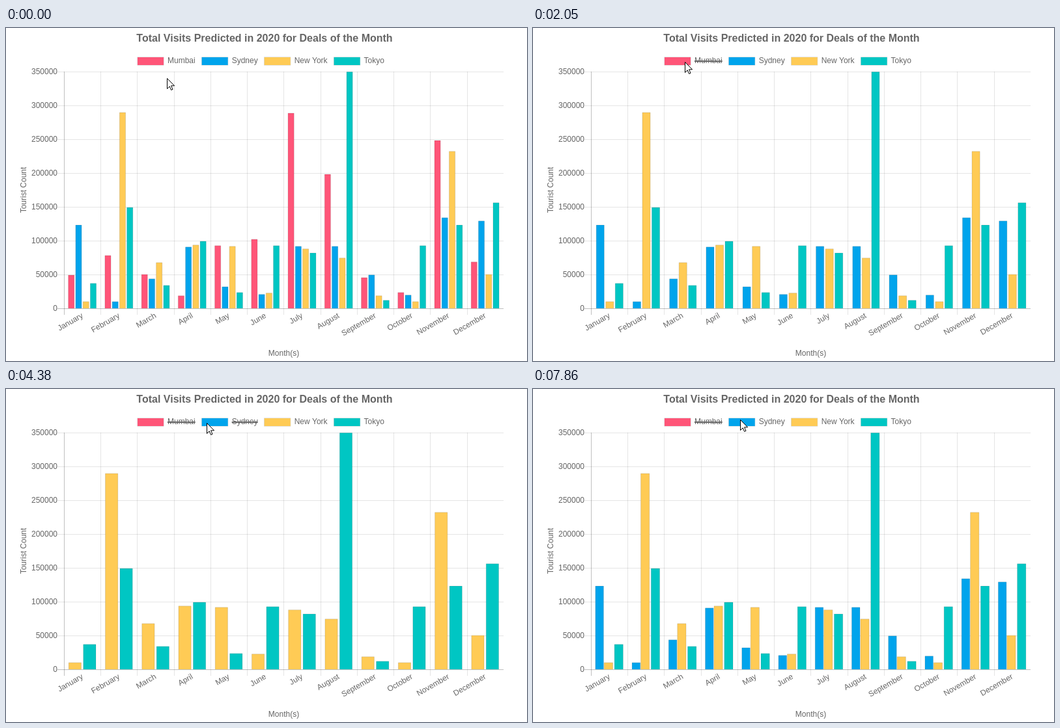
An HTML page with a canvas that plays this animation: 800x512 px, repeating every 8000 ms.

```html
<!DOCTYPE html>
<html lang="en">
<head>
<meta charset="utf-8">
<title>Total Visits</title>
<style>
  html, body { margin: 0; width: 100%; height: 100%; overflow: hidden; background: #fff; }
  canvas { display: block; }
</style>
</head>
<body>
<canvas id="stage" width="800" height="512"></canvas>
<script>
const ctx = document.getElementById('stage').getContext('2d');
const LOOP = 8000;
const FONT = '"Liberation Sans", Arial, sans-serif';
const LEFT = 89, RIGHT = 764, TOP = 67, BASE = 431, STEP = 56.23, PX_PER_K = 1.04;

const months = ['January', 'February', 'March', 'April', 'May', 'June', 'July',
  'August', 'September', 'October', 'November', 'December'];

// Visits in thousands
const series = [
  { name: 'Mumbai', color: '#ff5578',
    data: [49.5, 78.5, 50.5, 19, 93, 102.5, 289, 198.5, 45.8, 23.8, 248.5, 69] },
  { name: 'Sydney', color: '#00a4ec',
    data: [123.5, 10.3, 44, 91, 32.3, 21, 92, 92, 49.8, 20, 134.3, 129.5] },
  { name: 'New York', color: '#ffcb55',
    data: [10.3, 290, 68, 94, 92, 23, 88.3, 74.8, 19, 10.3, 232.5, 50.5] },
  { name: 'Tokyo', color: '#00c6c3',
    data: [37.3, 149.5, 34.3, 99.5, 23.8, 93, 82.3, 350, 12.3, 93, 123.5, 156.5] }
];

// Legend clicks: start time, visible series, repaint times
const clicks = [
  { start: 0, shown: [0, 1, 2, 3], paints: [0] },
  { start: 1640, shown: [1, 2, 3], paints: [1650, 1770, 1890, 2050, 2190, 2310, 2430, 2550] },
  { start: 3640, shown: [2, 3], paints: [3670, 3790, 3940, 4070, 4220, 4380] },
  { start: 7430, shown: [1, 2, 3], paints: [7470, 7590, 7720, 7860] }
];

// Pointer stops: time, x, y
const pointer = [
  [0, 247, 77], [500, 247, 68], [640, 248, 62], [790, 244, 53], [920, 239, 47],
  [1060, 235, 50], [1180, 233, 52], [2430, 235, 52], [2550, 240, 52], [2700, 261, 52],
  [2820, 284, 50], [2960, 292, 50], [3100, 303, 51], [3250, 308, 52], [5490, 397, -15],
  [5640, 397, -40], [6650, 320, 17], [6770, 318, 37], [6910, 318, 47]
];
const arrow = new Path2D('M.5 .5V16.5L4.2 12.8L6.6 18.4L9 17.4L6.6 11.8H11.6Z');

const easeOutQuart = p => 1 - (1 - p) ** 4;
const mix = (a, b, p) => a + (b - a) * p;
const lastBefore = (list, t, key) => list.filter(item => key(item) <= t).pop();

function text(str, x, y, { align = 'left', size = 12, weight = '', angle = 0 } = {}) {
  ctx.save();
  ctx.translate(x, y);
  ctx.rotate(angle * Math.PI / 180);
  ctx.font = `${weight} ${size}px ${FONT}`;
  ctx.textAlign = align;
  ctx.fillStyle = '#666';
  ctx.fillText(str, 0, angle === -30 ? 4 : 0);
  ctx.restore();
}

function line(x1, y1, x2, y2, color, width = 1) {
  ctx.strokeStyle = color;
  ctx.lineWidth = width;
  ctx.beginPath();
  ctx.moveTo(x1, y1);
  ctx.lineTo(x2, y2);
  ctx.stroke();
}

function drawAxes() {
  const shade = first => `rgba(0,0,0,${first ? 0.25 : 0.1})`;
  months.forEach((month, i) => {
    const x = Math.round(LEFT + i * STEP) + 0.5;
    line(x, TOP, x, BASE + 10, shade(i === 0));
    text(month, LEFT + (i + 0.5) * STEP, BASE + 10, { align: 'right', angle: -30 });
  });
  for (let k = 0; k <= 350; k += 50) {
    const y = BASE - k * PX_PER_K;
    line(LEFT - 10, y + 0.5, RIGHT, y + 0.5, shade(k === 0));
    text(String(k * 1000), LEFT - 10, y + 4, { align: 'right' });
  }
  text('Tourist Count', 31, 249, { align: 'center', angle: -90 });
  text('Month(s)', 426.5, 504, { align: 'center' });
}

function drawLegend(shown) {
  let x = 202;
  series.forEach(({ name, color }, i) => {
    ctx.strokeStyle = 'rgba(0,0,0,0.2)';
    ctx.lineWidth = 1;
    ctx.strokeRect(x, 45, 40, 12);
    ctx.fillStyle = color;
    ctx.fillRect(x, 45, 40, 12);
    text(name, x + 46, 54);
    ctx.font = `12px ${FONT}`;
    const width = ctx.measureText(name).width;
    if (!shown.includes(i)) line(x + 46, 51, x + 46 + width, 51, '#666', 2);
    x += 56 + width;
  });
}

// Offset and width of a bar inside its month
function slot(shown, s) {
  const size = STEP * 0.8 / shown.length;
  return { x: STEP * 0.1 + size * (shown.indexOf(s) + 0.05), w: size * 0.9 };
}

function drawBar(x, w, value, color) {
  const l = x + 0.5, r = x + w - 0.5, y = BASE - value * PX_PER_K + 0.5;
  ctx.beginPath();
  ctx.moveTo(l, BASE);
  ctx.lineTo(l, y);
  ctx.lineTo(r, y);
  ctx.lineTo(r, BASE);
  ctx.fillStyle = color;
  ctx.fill();
  ctx.strokeStyle = 'rgba(0,0,0,0.12)';
  ctx.lineWidth = 1;
  ctx.stroke();
}

function drawBars(shown, before, p) {
  for (const s of [...shown].reverse()) {
    const to = slot(shown, s);
    const from = before.includes(s) ? slot(before, s) : to;
    const x = mix(from.x, to.x, p), w = mix(from.w, to.w, p);
    series[s].data.forEach((v, i) => drawBar(LEFT + i * STEP + x, w, v, series[s].color));
  }
}

function drawPointer(t) {
  const [, x, y] = lastBefore(pointer, t, stop => stop[0]);
  ctx.save();
  ctx.translate(x, y);
  ctx.fillStyle = '#fff';
  ctx.fill(arrow);
  ctx.strokeStyle = '#000';
  ctx.lineWidth = 1;
  ctx.stroke(arrow);
  ctx.restore();
}

function draw(t) {
  const click = lastBefore(clicks, t, c => c.paints[0]);
  const before = clicks[Math.max(0, clicks.indexOf(click) - 1)].shown;
  const painted = lastBefore(click.paints, t, time => time);
  const p = easeOutQuart(Math.min(1, (painted - click.start) / 1000));

  ctx.fillStyle = '#fff';
  ctx.fillRect(0, 0, 800, 512);
  text('Total Visits Predicted in 2020 for Deals of the Month', 397, 21,
    { align: 'center', size: 16, weight: 'bold' });
  drawLegend(click.shown);
  drawAxes();
  drawBars(click.shown, before, p);
  drawPointer(t);
}

const begin = performance.now();
function tick() {
  draw((performance.now() - begin) % LOOP);
  requestAnimationFrame(tick);
}
tick();
</script>
</body>
</html>
```
